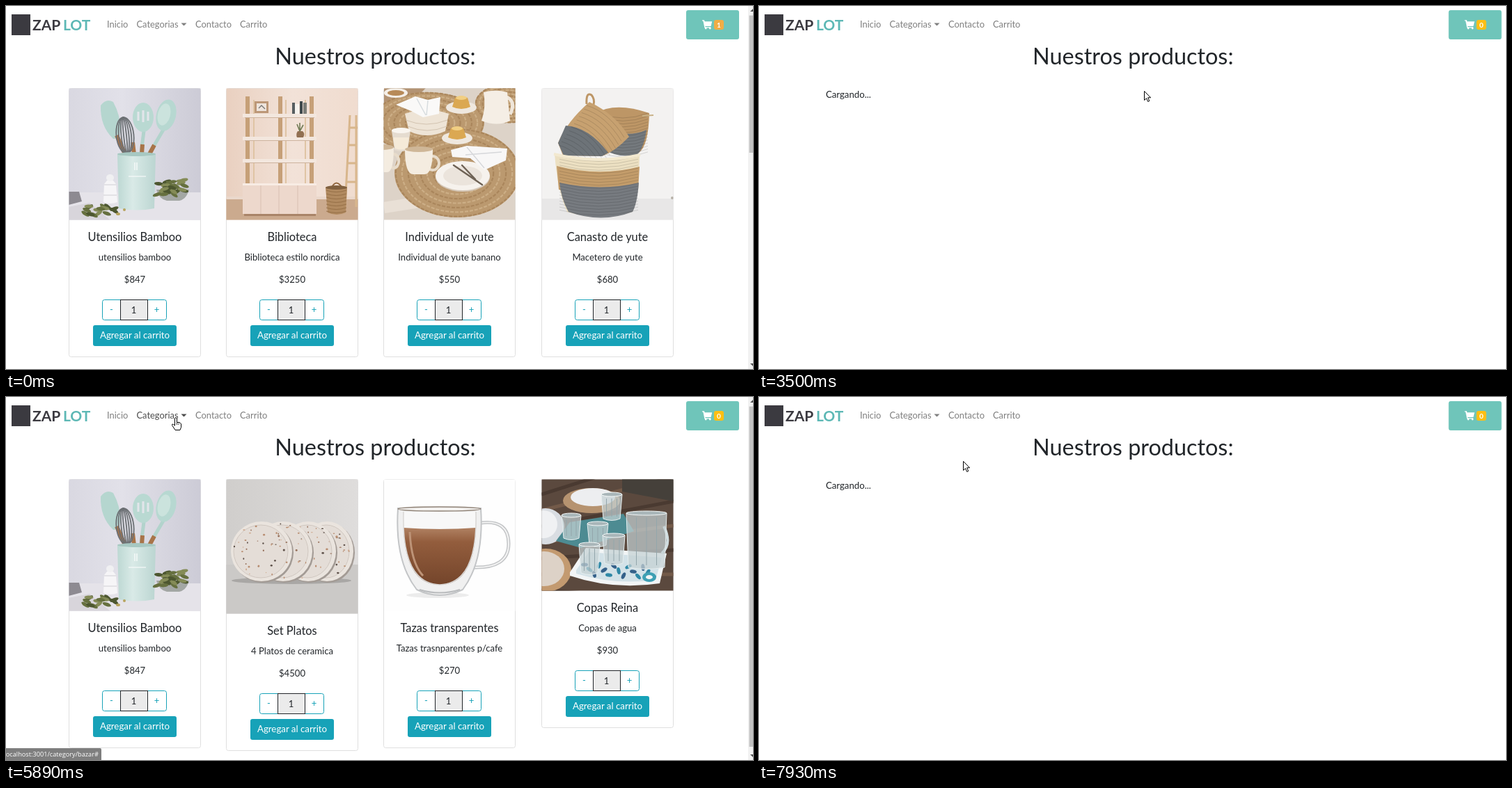
Animation, 1073 px wide and 522 px high, one loop 8 s. Source, as an HTML page:

```html
<!DOCTYPE html>
<html lang="es">
<head>
<meta charset="utf-8">
<title>Nuestros productos</title>
<style>
html, body { margin: 0; height: 100%; overflow: hidden; background: #fff; }
svg { display: block; }
text { font-family: Lato, "Open Sans", sans-serif; white-space: pre; }
</style>
</head>
<body>
<svg id="stage" width="1073" height="522">
  <defs>
    <linearGradient id="wall"><stop stop-color="#d9d8e1"/><stop offset=".4" stop-color="#e2e1e9"/><stop offset="1" stop-color="#cccbd6"/></linearGradient>
    <linearGradient id="mint"><stop stop-color="#bdd8d3"/><stop offset=".4" stop-color="#d9eae7"/><stop offset="1" stop-color="#bbd5d1"/></linearGradient>
    <linearGradient id="blush"><stop stop-color="#e9d0c0"/><stop offset=".5" stop-color="#f2e2d8"/><stop offset="1" stop-color="#f0dccf"/></linearGradient>
    <linearGradient id="studio"><stop stop-color="#d0cecc"/><stop offset="1" stop-color="#dfdddc"/></linearGradient>
    <linearGradient id="coffee" x2="0" y2="1"><stop stop-color="#b08162"/><stop offset=".25" stop-color="#935d3d"/><stop offset="1" stop-color="#74452b"/></linearGradient>
  </defs>
  <g id="page"></g>
  <g id="status"></g>
  <g id="cursor"></g>
</svg>
<script>
const $ = id => document.getElementById(id);
const R = (x, y, w, h, fill, more = '') => `<rect x="${x}" y="${y}" width="${w}" height="${h}" fill="${fill}" ${more}/>`;
const E = (x, y, rx, ry, fill, more = '') => `<ellipse cx="${x}" cy="${y}" rx="${rx}" ry="${ry}" fill="${fill}" ${more}/>`;
const P = (d, fill, more = '') => `<path d="${d}" fill="${fill}" ${more}/>`;
const L = (d, color, w = 1, more = '') => P(d, 'none', `stroke="${color}" stroke-width="${w}" ${more}`);
const T = (x, y, str, size, fill = '#212529', more = '') => `<text x="${x}" y="${y}" font-size="${size}" fill="${fill}" ${more}>${str}</text>`;
const mid = 'text-anchor="middle"';
const turn = (a, x, y) => `transform="rotate(${a} ${x} ${y})"`;
const many = (n, f) => Array.from({ length: n }, (_, i) => f(i)).join('');
const seeded = s => () => (s = s * 16807 % 2147483647) / 2147483647;
const clamp = v => Math.max(0, Math.min(1, v));

// ---- product pictures, in stage coordinates ----
function utensils() {
  const leaf = (x, y, w, h, n, seed) => {
    const r = seeded(seed);
    return many(n, i => {
      const px = x + (r() - .5) * w, py = y + (r() - .5) * h;
      return E(px, py, 6.5, 2.6, ['#66703f', '#848b57', '#4d5730'][i % 3], turn(r() * 90 - 45, px, py));
    });
  };
  return R(90, 118, 190, 190, 'url(#wall)') + R(90, 268, 190, 40, '#e5e3e9') +
    P('M90 267h15l4 14-19 5z', '#8d8a91') + P('M90 289l30-6 30 25h-60z', '#d8d5db') +
    P('M136 143q8-11 18-5 11 20 10 40-1 14-10 13-19-18-18-48z', '#b5d6cf') +
    L('M159 186l12 27', '#a87449', 6) + L('M198 180l-4 32M226 178l-20 34', '#b2d3cc', 5) +
    E(197, 160, 15, 21, '#b9d9d2') + L('M190 152v13M197 150v17M204 152v13', '#e3e5ea', 3) +
    E(230, 157, 14, 23, '#b7d8d1', turn(14, 230, 157)) + E(227, 156, 9, 16, '#cbe3dd', turn(14, 227, 156)) +
    L('M184 213l-2-17M195 213l1-14M206 213l7-13', '#a87449', 6) +
    many(4, i => E(171, 186, 2 + i * 3.5, 26, 'none', 'stroke="#6c7074" stroke-width="1.8" ' + turn(-6, 171, 186))) +
    P('M160 213h55l-2 78q-25 5-51 0z', 'url(#mint)') + E(187.5, 213, 27.5, 3, '#a7c8c2') +
    L('M185 225v11M188 225v11M176 245h25', '#fff', 1.2) +
    P('M141 256l4-5h9l4 5 2 26q-10 4-20 0z', '#f6f5f7') + E(149.5, 247, 5.5, 5, '#f0f0f2') + L('M141 257h17M140 272h19', '#cfced4') +
    P('M216 264h47q-4 14-14 16h-18q-11-2-15-16z', '#a3a7a4') + leaf(238, 261, 42, 24, 26, 7) + leaf(135, 295, 42, 14, 16, 21) +
    E(161, 299, 3, 2, '#b8a45f') + E(170, 293, 2, 2, '#b8a45f');
}

function bookcase() {
  const wood = '#c6a078', board = '#f3e7de';
  return R(316, 118, 191, 190, 'url(#blush)') + R(316, 277, 191, 31, '#cbaa8e') + R(316, 274, 191, 4, '#ead8cc') +
    L('M494 157l-7 132M503 157v132M494 175h11M492 200h12M490 226h14M488 253h16', '#d8b68c', 3) +
    [344, 391, 436].map(x => R(x, 130, 6, 170, wood)).join('') + L('M356 135v120M402 135v120M430 135v120', '#dfc4a4', 2) +
    [155, 188, 220].map(y => R(340, y, 106, 5, board) + R(343, y + 5, 100, 1, '#cdb39e')).join('') +
    R(357, 137, 20, 17, '#bc9777') + R(360, 140, 14, 11, '#eee4dc') + L('M363 147l4-4 5 5', '#777', 1.4) +
    R(411, 139, 4, 16, '#575e60') + R(415, 141, 6, 14, '#f6f3ee') + R(422, 137, 4, 18, '#3f494c') + R(427, 139, 5, 16, '#7b7d78') +
    P('M419 180q-3 4-1 9h9q3-6-1-9z', '#927052') + L('M422 180l-4-10M422 180v-12M422 180l5-9', '#727b55', 1.6) +
    R(340, 255, 106, 44, '#edd8cc') + R(340, 255, 106, 3, '#f8ece4') +
    L('M366 258v41M392 258v41M419 258v41', '#d9c0b2') + R(342, 299, 103, 3, '#a98468') +
    L('M467 263q7-17 17 0', '#92683f', 2) + P('M459 261h31l-2 36q-13 6-26 0z', '#b18a60') +
    many(7, i => L(`M460 ${265 + i * 5}q14 5 29 0`, '#8e6941', .8)) + E(474.5, 261, 15.5, 3, '#80603f');
}

function tableware() {
  const mat = (x, y, rx, ry) => E(x, y, rx, ry, '#bb996f') +
    many(10, i => E(x, y, rx * (i + .8) / 10, ry * (i + .8) / 10, 'none', `stroke="${i % 2 ? '#aa865c' : '#ccae86'}" stroke-width="2.2" stroke-dasharray="5 2"`));
  const cup = (x, y, w, h) => E(x + w, y + 2, w * .45, h * .55, 'none', 'stroke="#e8dccb" stroke-width="4"') +
    P(`M${x - w} ${y - h}h${2 * w}q0 ${2 * h}${-w * .6} ${2 * h}h${-w * .8}q${-w * .6} 0${-w * .6} ${-2 * h}z`, '#f4ece0') + E(x, y - h, w, 4, '#cfb798');
  const cake = (x, y) => E(x, y + 5, 22, 9, '#efe8df') + P(`M${x - 13} ${y + 4}l4-13q9-5 18 0l4 13q-13 6-26 0z`, '#dba852') + E(x, y - 9, 8, 3, '#f1cf83');
  return R(543, 118, 190, 190, '#ddd3c8') + P('M543 118h60l-60 60z', '#b39373') + L('M543 290l190-30', '#e9e0d6', 16) +
    mat(605, 168, 82, 44) + mat(722, 140, 48, 28) + mat(648, 240, 90, 64) +
    cake(654, 141) + cake(648, 185) + E(560, 125, 17, 7, '#f4efe8') + E(560, 125, 12, 4, '#b78a58') +
    P('M573 155q31-12 63 0l-5 25q-27 12-52 0z', '#eee4d6') + L('M574 164q30 12 60 0M577 173q28 12 56 0', '#d3c4b1') +
    P('M560 142l28-12 18 5 18-4-2 24-23 5-17-9z', '#faf9f8') + L('M590 133l13 24M606 136l-2 21', '#d7dcdf', 1.5) +
    L('M717 130q17 6 7 26', '#efe6da', 5) + P('M686 124q17-5 34 0l4 41q-18 9-41 0 7-20 3-41z', '#f5eee5') +
    P('M554 179h27l-4 28q-9 4-19 0z', '#e5dcd0') + E(567.5, 179, 13.5, 4, '#f9f5ef') + P('M556 189h23l-3 16q-8 3-17 0z', '#f5ead8') +
    cup(593, 224, 20, 18) + cup(541, 221, 16, 18) +
    E(656, 246, 39, 21, '#d5c7b7') + E(656, 244, 39, 21, '#f6f2ed') + E(656, 244, 28, 14, '#ebe4dc') +
    P('M639 207l23-6 58 4-2 17-31 14-20-17-26-2z', '#f8f7f7') + L('M662 203l25 30M660 214l52-4', '#d6d7da', 1.4) +
    L('M643 229l41 28M655 229l19 20', '#6e6255', 2.4, 'stroke-linecap="round"');
}

function baskets() {
  const rope = (n, y, x1, x2, sag) => many(n, i => L(`M${x1} ${y + i * 4.3}q${(x2 - x1) / 2} ${sag} ${x2 - x1} 0`, '#0002', 1));
  return R(769, 118, 190, 190, '#f3f2f1') + R(769, 277, 190, 31, '#e8e7e7') +
    P('M846 155q28-18 78-1-1 47-15 57-28 8-55-7z', '#bd9666') + P('M862 179q35 10 58-1-4 28-14 36-28 5-44-7z', '#74797d') +
    rope(14, 154, 850, 922, 14) + L('M914 158l16-1', '#c9b287', 2) + L('M834 141q-1-18 7-13 5 6 3 14', '#bd9666', 3) +
    P('M838 138q38 18 57 50-20 21-39 28l-56-1-7-18q12-30 45-59z', '#c7a170') +
    P('M804 172q33 2 61 39l-9 5-55-1-8-18z', '#6d7378') +
    many(12, i => L(`M${834 - i * 3.6} ${143 + i * 5.2}q31 9 ${54 - i * .5} 46`, '#0002', 1)) +
    P('M788 212q68 14 122 1-1 60-10 83-45 15-94 0-14-30-18-84z', '#ece0c2') +
    P('M791 230q62 16 119 1l-2 33q-58 15-114 0z', '#c39c6a') + P('M795 254q60 13 114 0-2 29-9 42-45 17-92 0-11-20-13-42z', '#777b80') +
    rope(19, 216, 795, 908, 15) + L('M787 213q62 15 124 1', '#f3e9d0', 4) + E(957, 276, 2, 2, '#b7b1a8');
}

function plates() {
  const r = seeded(11);
  const plate = (x, rx) => E(x + 2, 224, rx, 43, '#a39b95') + E(x, 222, rx, 43, '#eae4de') + E(x - 1, 222, rx - 5, 38, '#e4ddd7', 'stroke="#cfc6bf"') +
    many(38, i => {
      const a = r() * 6.28, d = Math.sqrt(r()) * .93;
      return E(x + Math.cos(a) * d * rx, 222 + Math.sin(a) * d * 43, .6 + r() * 1.2, .6 + r(), ['#b88d70', '#96705a', '#cfab91', '#5d5049'][i % 4]);
    });
  return R(316, 118, 191, 194, 'url(#studio)') + R(316, 241, 191, 71, '#cbc9c7') + E(410, 264, 86, 5, '#a9a7a5') +
    plate(461, 38) + plate(434, 40) + plate(398, 42) + plate(367, 44);
}

function mug() {
  const glass = '#c3c5c7';
  return R(543, 118, 190, 190, '#fefefe') + E(620, 285, 45, 4, '#ececec') +
    L('M682 181q40-5 40 30 0 36-52 34', glass, 5) + L('M682 181q40-5 40 30 0 36-52 34', '#f4f4f4', 2) +
    P('M563 160h119q5 76-26 117-33 16-66 0-32-41-27-117z', '#f0f0f0', `stroke="${glass}" stroke-width="2"`) +
    P('M571 165h103l1 24H570z', '#f8f8f8') + P('M571 188q52 4 104 0-3 82-52 82t-52-82z', 'url(#coffee)') +
    L('M571 165q-3 103 52 105 55-2 52-105', '#d9d7d5', 1.5) + E(622.5, 161, 59.5, 3, '#f4f2f0', 'stroke="#8f8276" stroke-width="1.3"') +
    L('M580 194q2 45 19 63', '#bd9377', 3) + L('M594 277q29 9 58 0', '#b9bbbd', 2);
}

function goblets() {
  const cup = (x, y, w, h) => P(`M${x - w} ${y}h${2 * w}l-3 ${h}q${3 - w} 5 ${6 - 2 * w} 0z`, '#c5d1d5', 'fill-opacity=".72" stroke="#e6eeef"') +
    E(x, y, w, 3, '#a9b6b9', 'stroke="#f4f8f8"') + many(3, i => L(`M${x - w / 2 + i * w / 2} ${y + 6}v${h - 9}`, '#93a6ab'));
  return R(769, 118, 190, 162, '#5b493e') + many(7, i => L(`M769 ${140 + i * 23}l190 ${-60 + i * 12}`, i % 2 ? '#735a49' : '#4a3a31', 5)) +
    P('M885 118h74v32l-74-14z', '#45403a') + E(841, 149, 41, 18, '#b69370') + E(843, 144, 32, 13, '#edeef0') + E(775, 186, 27, 26, '#d9dde2') + E(772, 183, 20, 20, '#f0f1f3') +
    E(775, 249, 37, 31, '#c39a70') + E(773, 247, 29, 25, '#ddd2c7') +
    P('M790 207l20-27 77-12 15 25-76 24z', '#4d8b92') +
    P('M810 252l23-35 116 8-10 43q-67 10-129-11z', '#f2f5f6') + P('M819 249l18-26 105 8-9 32q-58 8-114-9z', '#d3e2e8') +
    many(15, i => E(831 + i * 7, 241 + (i * 7 % 20), 5, 2.6, i % 2 ? '#2f88a6' : '#35618a', turn(i * 37, 831 + i * 7, 241 + i * 7 % 20))) +
    E(924, 259, 10, 7, '#3ea0b4') + E(924, 259, 5, 3, '#f2f5f6') +
    cup(870, 140, 15, 35) + cup(812, 170, 14, 33) + cup(850, 182, 15, 31) +
    L('M945 186q12 25-3 39', '#cfdcdf', 4) + cup(920, 167, 29, 78) + cup(873, 199, 16, 40) + cup(838, 212, 15, 41);
}

// ---- page parts ----
const teal = '#17a2b8', ink = '#212529';

function card(i, height, art, title, text, price) {
  const x = Math.floor(90.4 + i * 226.25), cx = x + 95, dy = height - 189;
  const line = (y, s, size) => T(cx, y, s, size, ink, mid);
  return R(x + .5, 118.5, 189, 386 + dy, '#fff', 'rx="3" stroke="#dfdfdf"') +
    (art ? `<svg x="${x + .5}" y="118.5" width="189" height="${height}" viewBox="${x + .5} 118.5 189 ${height}">${art()}</svg>` : '') +
    `<g transform="translate(0 ${dy})">` +
    line(338, title, 16.4) + line(365.5, text, 13.1) + line(397.5, price, 13.1) +
    R(cx - 46.5, 422.5, 92, 29, '#fff', `rx="3" stroke="${teal}"`) +
    R(cx - 20.5, 422.5, 39, 29, '#ebebeb', `stroke="${ink}"`) +
    T(cx - 33.5, 441, '-', 13.1, teal, mid) + T(cx - 1.5, 441.5, '1', 13.1, ink, mid) + T(cx + 31.5, 441, '+', 13.1, teal, mid) +
    R(cx - 60, 459, 120, 30, teal, 'rx="3"') + T(cx, 478, 'Agregar al carrito', 13.3, '#fff', mid) + '</g>';
}

const bamboo = ['Utensilios Bamboo', 'utensilios bamboo', '$847'];
const home = [
  [189, utensils, ...bamboo],
  [189, bookcase, 'Biblioteca', 'Biblioteca estilo nordica', '$3250'],
  [189, tableware, 'Individual de yute', 'Individual de yute banano', '$550'],
  [189, baskets, 'Canasto de yute', 'Macetero de yute', '$680']];
const bazaar = [
  [189, utensils, ...bamboo],
  [193, plates, 'Set Platos', '4 Platos de ceramica', '$4500'],
  [189, mug, 'Tazas transparentes', 'Tazas trasnparentes p/cafe', '$270'],
  [160, goblets, 'Copas Reina', 'Copas de agua', '$930']];
const loadedAt = [0, 4700, 4600, 4850];

function nav(shift, count, shade) {
  const link = (x, s, c = '#7f7f7f') => T(x, 31.4, s, 12.9, c);
  return R(8, 12, 27, 30, '#3b3a40') +
    T(38, 35, 'ZAP', 21, '#3b3a40', 'font-weight="bold"') + T(82, 35, 'LOT', 21, '#5db8b5', 'font-weight="bold"') +
    link(145, 'Inicio') + link(187.5, 'Categorias', shade) + P('M251.5 24.5h8l-4 4z', shade) + link(272, 'Contacto') + link(336, 'Carrito') +
    `<g transform="translate(${shift} 0)">` + R(977, 6, 76, 42, '#6fc5ba', 'rx="3"') +
    P('M1000 20.3h3l.6 2h10.6l-1.6 6.6h-8.3l.3 1.3h7.6v1.2h-8.8l-2-9.8h-1.4z', '#fff') + E(1005.2, 32, 1.4, 1.4, '#fff') + E(1011.3, 32, 1.4, 1.4, '#fff') +
    R(1017, 20, 14, 14, count ? '#f0ad45' : '#fdbf14', 'rx="3"') + T(1024, 30.8, count, 10, '#fff', mid + ' font-weight="bold"') + '</g>' +
    T(530.5 + shift / 2, 83.5, 'Nuestros productos:', 32.4, ink, mid);
}

const scrollbar = end => R(1066, 0, 7, 522, '#f1f1f1') + R(1067.6, 13.6, 6, end - 13.6, '#c1c1c1') +
  P('M1069 8l4-4v4z', '#505050') + P('M1069 514l4 4v-4z', '#505050');

const menu = () => R(181.5, 43.5, 129, 64, '#fff', 'rx="3" stroke="#ccc"') +
  T(201, 67, 'Bazar', 13.1) + T(201, 92.5, 'Deco de interior', 13.1);

const between = (t, a, b) => t >= a && t < b;

function scene(t) {
  const loading = between(t, 3500, 4240) || t >= 7460;
  const open = between(t, 1420, 3500) || between(t, 6020, 7460);
  const hover = between(t, 1150, 1420) || between(t, 5670, 6020);
  const first = t < 3500;
  const cards = loading ? T(96, 131.5, 'Cargando...', 13.2)
    : (first ? home : bazaar).map(([h, art, ...words], i) =>
      first || t >= loadedAt[i] ? card(i, h, art, ...words) : card(i, 19, null, ...words)).join('') + scrollbar(first ? 211 : 503);
  return nav(loading ? 13.6 : 0, first ? 1 : 0, open ? '#191919' : hover ? '#4c4c4c' : '#7f7f7f') + cards + (open ? menu() : '');
}

// ---- link address in the corner: from, to, path, width ----
const links = [
  [1150, 2080, '#', 73], [2080, 2860, 'category/bazar', 132],
  [4280, 4510, 'item/Vkw3oyVKbBARXifuAUwO', 200],
  [5890, 6340, 'category/bazar#', 137], [6340, 6670, 'category/decoInterior', 159], [6760, 7500, 'category/decoInterior', 159]];

function status(t) {
  const link = links.find(([a, b]) => between(t, a, b));
  if (!link) return '';
  const [a, b, path, w] = link;
  const chained = links.some(l => l[0] === b), follows = links.some(l => l[1] === a);
  const alpha = Math.min(follows ? 1 : clamp(.5 + (t - a) / 160), chained ? 1 : clamp((b - t) / 95));
  return R(-4, 505, w + 4, 20, '#000', `rx="2" opacity="${alpha}"`) +
    T(-2.5, 517, 'localhost:3001/' + path, 9.2, '#fff', 'style="font-family:\'Open Sans\',sans-serif"');
}

// ---- pointer: time, x, y, shape (a arrow, h hand, - none) ----
const track = [
  [0, 0, 0, '-'], [440, 1000, 506, 'a'], [575, 483, 110, 'a'], [620, 483, 110, '-'],
  [1010, 272, 1, 'a'], [1150, 262, 20, 'h'], [1380, 252, 23, 'h'], [1620, 250, 21, 'h'],
  [1830, 250, 21, 'h'], [2080, 236, 52, 'h'], [2520, 225, 61, 'h'], [2660, 225, 61, 'h'],
  [2780, 300, 74, 'a'], [3050, 553, 117, 'a'], [3310, 553, 117, 'a'], [3311, 553, 122, 'a'],
  [3680, 553, 122, 'a'], [3720, 552, 121, 'a'], [3760, 553, 121, 'a'], [4240, 553, 121, 'a'],
  [4430, 557, 93, 'a'], [4560, 560, 90, 'a'], [5040, 656, 261, 'a'], [5070, 656, 261, 'a'],
  [5670, 246, 32, 'h'], [5710, 244, 29, 'h'], [6060, 244, 29, 'h'], [6340, 264, 82, 'h'],
  [6560, 290, 98, 'a'], [6620, 293, 101, 'a'], [6670, 294, 102, 'a'], [6750, 294, 102, 'a'],
  [6790, 293, 96, 'h'], [7120, 291, 91, 'h'], [7460, 291, 91, 'a'], [7930, 291, 91, 'a'],
  [7931, 293, 92, 'a'], [8000, 293, 92, 'a']];
const outline = 'stroke="#000" stroke-linejoin="round"';
const shapes = {
  '-': '',
  a: P('M.5 .5v13l3-2.8 2.2 4.8 2.1-1-2.2-4.7h4z', '#fff', outline),
  h: P('M-1.5 1.5q1.5-2 3 0v6q4-1 6 2 1 5-1.5 9h-7l-4.5-7q0-2.5 2-1l2 1.5z', '#fff', outline) + L('M1.5 8v3M4 8.5v2.5', '#000', .8)
};

function pointer(t) {
  const i = track.findIndex((k, n) => !track[n + 1] || t < track[n + 1][0]);
  const [a, x, y, shape] = track[i], [b, x2, y2] = track[i + 1] || track[i];
  const p = b > a ? clamp((t - a) / (b - a)) : 0;
  return `<g transform="translate(${x + (x2 - x) * p} ${y + (y2 - y) * p})">${shapes[shape]}</g>`;
}

const shown = {};
function put(id, html) {
  if (shown[id] !== html) $(id).innerHTML = shown[id] = html;
}

// moments at which the page itself changes
const cuts = [0, 1150, 1420, 3500, 4240, 4600, 4700, 4850, 5670, 6020, 7460];
const start = performance.now();
let current;
function draw() {
  const t = (performance.now() - start) % 8000;
  const cut = cuts.findLast(c => c <= t);
  if (cut !== current) put('page', scene(current = cut));
  put('status', status(t));
  put('cursor', pointer(t));
  requestAnimationFrame(draw);
}
draw();
</script>
</body>
</html>
```
